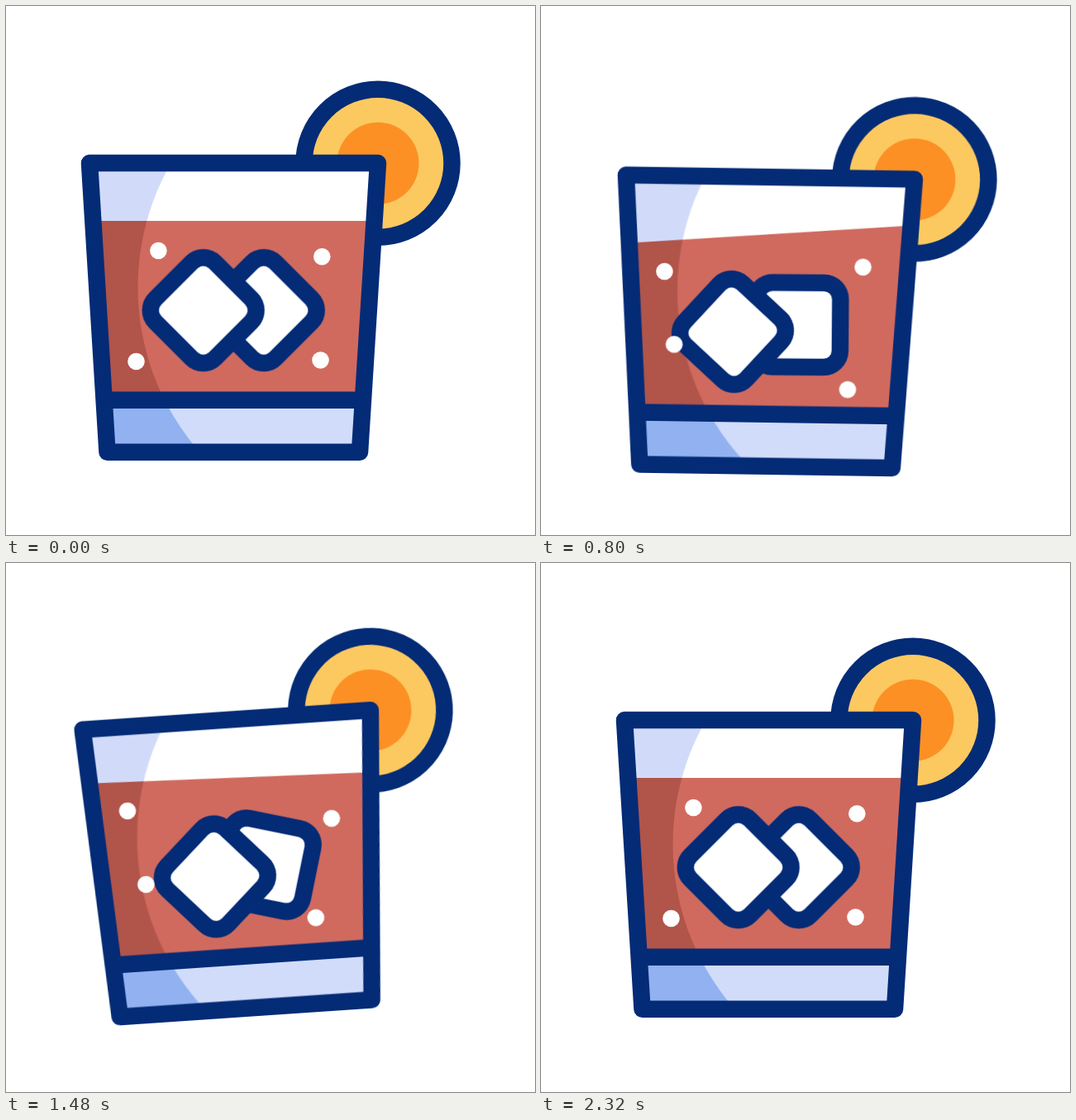
An HTML page for the animation above (2400 ms loop, 640 by 640 pixels).

```html
<!DOCTYPE html>
<html lang="en">
<head>
<meta charset="utf-8">
<title>Rocking drink</title>
<style>
  html, body { margin: 0; width: 100%; height: 100%; overflow: hidden; background: #fff; }
  svg { display: block; width: 100vw; height: 100vh; }

  .line { fill: none; stroke: #042b76; stroke-width: 20.5; stroke-linejoin: round; }
  .ice { fill: #fff; }

  /* --a is the rest pose, --b, --c and --d are the three swings */
  .slosh, .rock {
    animation: slosh 2400ms cubic-bezier(.33333, 0, .66667, 1) infinite;
    transform: var(--a);
  }
  .rock { animation-name: rock; transform-origin: 320px 320px; }

  @keyframes slosh {
    0%, 4.1667%, 96.6667%, 100% { transform: var(--a); }
    25% { transform: var(--b); }
    50% { transform: var(--c); }
    75% { transform: var(--d); }
  }
  @keyframes rock {
    0%, 4.1667%, 96.6667%, 100% { transform: rotate(0deg); }
    20%, 70% { transform: rotate(-8deg); }
    45% { transform: rotate(8deg); }
  }

  .bob { --a: translateY(0); --b: translateY(37px); --c: translateY(-37px); --d: var(--b); }
  .tilt {
    --a: rotate(0deg); --b: rotate(-9.8deg); --c: rotate(11deg); --d: var(--b);
    transform-origin: 265px 260px;
  }

  .back { --a: translate(311.8px, 368.2px) rotate(-45deg);
          --b: translate(311.8px, 368.2px) rotate(-14deg);
          --c: translate(311.8px, 368.2px) rotate(38deg);
          --d: translate(311.8px, 368.2px) rotate(-12deg); }
  .front { --a: translate(238.7px, 368.2px) rotate(45deg);
           --b: translate(225.5px, 373.2px) rotate(25.5deg);
           --c: translate(253.5px, 390.5px) rotate(89deg);
           --d: translate(243px, 363.4px) rotate(-3.5deg); }

  .bubble { fill: #fff; --a: translate(0, 0); --d: var(--b); }
  .b1 { --b: translate(-34.5px, 23px); --c: translate(-37px, -26.8px); }
  .b2 { --b: translate(2.4px, -24.5px); --c: translate(19.8px, 46.3px); }
  .b3 { --b: translate(2.3px, -25px); --c: translate(11.4px, -67px); }
  .b4 { --b: translate(-2.5px, 26px); --c: translate(-22.4px, -7.6px); }
</style>
</head>
<body>
<svg viewBox="0 0 640 640">
  <defs>
    <path id="glass" d="M101 190H450L428 539.8H122.5Z"/>
    <path id="shade" d="M462.5 37.5A303 303 0 0 0 462.5 643.5V900H-200V37.5Z"/>
    <rect id="cube" x="-51" y="-51" width="102" height="102" rx="20"/>
    <clipPath id="inside"><use href="#glass"/></clipPath>
    <clipPath id="wet"><rect x="-200" y="260" width="1040" height="640"/></clipPath>
    <clipPath id="foot"><rect x="90" y="476.5" width="370" height="70"/></clipPath>
  </defs>

  <g class="slosh bob">
    <g class="rock">
      <circle cx="450" cy="190.2" r="89.5" fill="#fbc95f"/>
      <circle cx="450" cy="190.2" r="49.5" fill="#fc9025"/>
      <circle class="line" cx="450" cy="190.2" r="89.5"/>

      <g clip-path="url(#inside)">
        <use href="#glass" fill="#fff"/>
        <g class="slosh tilt">
          <use href="#shade" fill="#d1dbf9"/>
          <rect x="-200" y="260" width="1040" height="640" fill="#d06a5e"/>
          <g clip-path="url(#wet)"><use href="#shade" fill="#b1544a"/></g>
        </g>
        <g clip-path="url(#foot)">
          <rect x="90" y="476" width="370" height="80" fill="#d1dcfa"/>
          <g class="slosh tilt"><use href="#shade" fill="#91b1f1"/></g>
        </g>
      </g>

      <g class="slosh back"><use href="#cube" class="line ice"/></g>
      <g class="slosh front"><use href="#cube" class="line ice"/></g>

      <circle class="slosh bubble b1" cx="184.4" cy="296" r="10.3"/>
      <circle class="slosh bubble b2" cx="382.3" cy="303.2" r="10.3"/>
      <circle class="slosh bubble b3" cx="157.5" cy="430" r="10.3"/>
      <circle class="slosh bubble b4" cx="380.5" cy="428.5" r="10.3"/>

      <path class="line" d="M118.6 476.7H432"/>
      <use href="#glass" class="line"/>
    </g>
  </g>
</svg>
</body>
</html>
```
